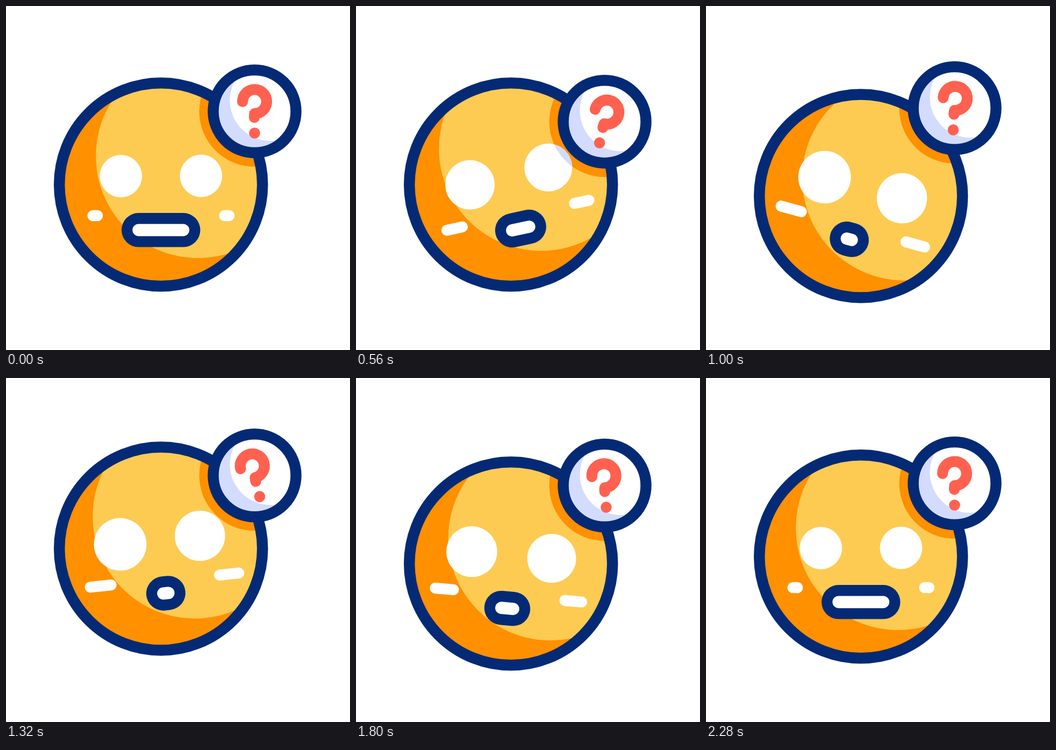
An HTML page with a canvas for the animation above (2640 ms loop, 640x640 px).

```html
<!DOCTYPE html>
<html lang="en">
<head>
<meta charset="utf-8">
<title>Puzzled face</title>
<style>
html, body { margin: 0; height: 100%; overflow: hidden; background: #fff; }
canvas { display: block; width: 100vw; height: 100vh; }
</style>
</head>
<body>
<canvas></canvas>
<script>
const canvas = document.querySelector('canvas');
const ctx = canvas.getContext('2d');
const LOOP = 2640, STEP = 40, LAST = 2280;
const NAVY = '#042a76', YELLOW = '#fdcb52', ORANGE = '#ff9000',
      CORAL = '#ff6150', LILAC = '#d3dcfd', WHITE = '#fff';

// Tracks are [time, value] pairs, eased in and out between neighbours.
const headY = [[0, 0], [390, 40], [730, -40], [1050, 25.5], [1430, -25], [1800, 13], [2120, 0]];
const headTurn = [[0, 0], [470, -15], [960, 16], [1400, -8], [1800, 5], [2260, 0]];
const bubbleY = [[0, 0], [640, 20], [1240, -20], [1540, 10], [2000, 0]];
const markTurn = [[0, 0], [700, 15], [1415, -15], [2005, 0]];
const surprise = [[0, 0], [890, 1], [1640, 1], [2250, 0]];

const mix = (a, b, p) => a + (b - a) * p;

function at(track, t) {
  const i = track.findIndex(key => key[0] > t);
  if (i < 0) return track[track.length - 1][1];
  const [t0, a] = track[i - 1], [t1, b] = track[i];
  const u = (t - t0) / (t1 - t0);
  return mix(a, b, u * u * (3 - 2 * u));
}

function circle(x, y, r) {
  ctx.beginPath();
  ctx.arc(x, y, r, 0, 2 * Math.PI);
}

function disc(x, y, r, color) {
  circle(x, y, r);
  ctx.fillStyle = color;
  ctx.fill();
}

function ring(x, y, r) {
  circle(x, y, r);
  ctx.strokeStyle = NAVY;
  ctx.lineWidth = 20.5;
  ctx.stroke();
}

function pill(x, y, half, width, color) {
  ctx.beginPath();
  ctx.moveTo(x - half, y);
  ctx.lineTo(x + half, y);
  ctx.strokeStyle = color;
  ctx.lineWidth = width;
  ctx.stroke();
}

function group(x, y, turn, paint) {
  ctx.save();
  ctx.translate(x, y);
  ctx.rotate(turn * Math.PI / 180);
  paint();
  ctx.restore();
}

function draw(t) {
  const p = at(surprise, t);
  const hx = 288.2, hy = 332.3 + at(headY, t), turn = at(headTurn, t);
  const bx = 462.5, by = 196 + at(bubbleY, t);
  const onHead = paint => group(hx, hy, turn, paint);

  ctx.fillStyle = WHITE;
  ctx.fillRect(0, 0, 640, 640);
  ctx.lineCap = ctx.lineJoin = 'round';

  // Head with its shading and the bubble's shadow
  ctx.save();
  circle(hx, hy, 189);
  ctx.clip();
  disc(hx, hy, 195, ORANGE);
  onHead(() => disc(69, -53.3, 190, YELLOW));
  disc(bx, by, 103, ORANGE);
  ctx.restore();
  ring(hx, hy, 189);

  // Eyes, tinted where the shadow falls on them
  ctx.save();
  onHead(() => {
    circle(-74.5, -15.8, mix(39.4, 48.9, p));
    const r = mix(39.4, 46.8, p);
    ctx.moveTo(74.7 + r, -16.3);
    ctx.arc(74.7, -16.3, r, 0, 2 * Math.PI);
    ctx.fillStyle = WHITE;
    ctx.fill();
  });
  ctx.clip();
  disc(bx, by, 103, LILAC);
  ctx.restore();

  // Cheeks and mouth
  onHead(() => {
    pill(mix(-122.3, -118.6, p), 57.7, mix(4.2, 19.5, p), 20.5, WHITE);
    pill(mix(122.6, 121.5, p), mix(57.7, 60, p), mix(4.2, 18, p), 20.5, WHITE);
    const x = 0.6 * p, y = mix(84.5, 83.4, p), half = mix(41.5, 4.8, p);
    pill(x, y, half, 63.5, NAVY);
    pill(x, y, half, 22.8, WHITE);
  });

  // Bubble
  ctx.save();
  circle(bx, by, 77);
  ctx.clip();
  disc(bx, by, 80, LILAC);
  disc(bx + 29.5, by - 20.5, 75.5, WHITE);
  ctx.restore();
  ring(bx, by, 77);

  // Question mark
  group(bx, by, at(markTurn, t), () => {
    ctx.beginPath();
    ctx.arc(0, -18.2, 22.4, Math.PI, 2.5 * Math.PI);
    ctx.lineTo(-0.5, 11.3);
    ctx.strokeStyle = CORAL;
    ctx.lineWidth = 20.3;
    ctx.stroke();
    disc(0, 40.5, 10.3, CORAL);
  });
}

function frame(now) {
  const dpr = window.devicePixelRatio || 1;
  const w = Math.round(innerWidth * dpr), h = Math.round(innerHeight * dpr);
  if (canvas.width !== w || canvas.height !== h) {
    canvas.width = w;
    canvas.height = h;
  }
  ctx.setTransform(w / 640, 0, 0, h / 640, 0, 0);
  draw(Math.min(LAST, Math.floor(now % LOOP / STEP) * STEP));
  requestAnimationFrame(frame);
}
requestAnimationFrame(frame);
</script>
</body>
</html>
```
